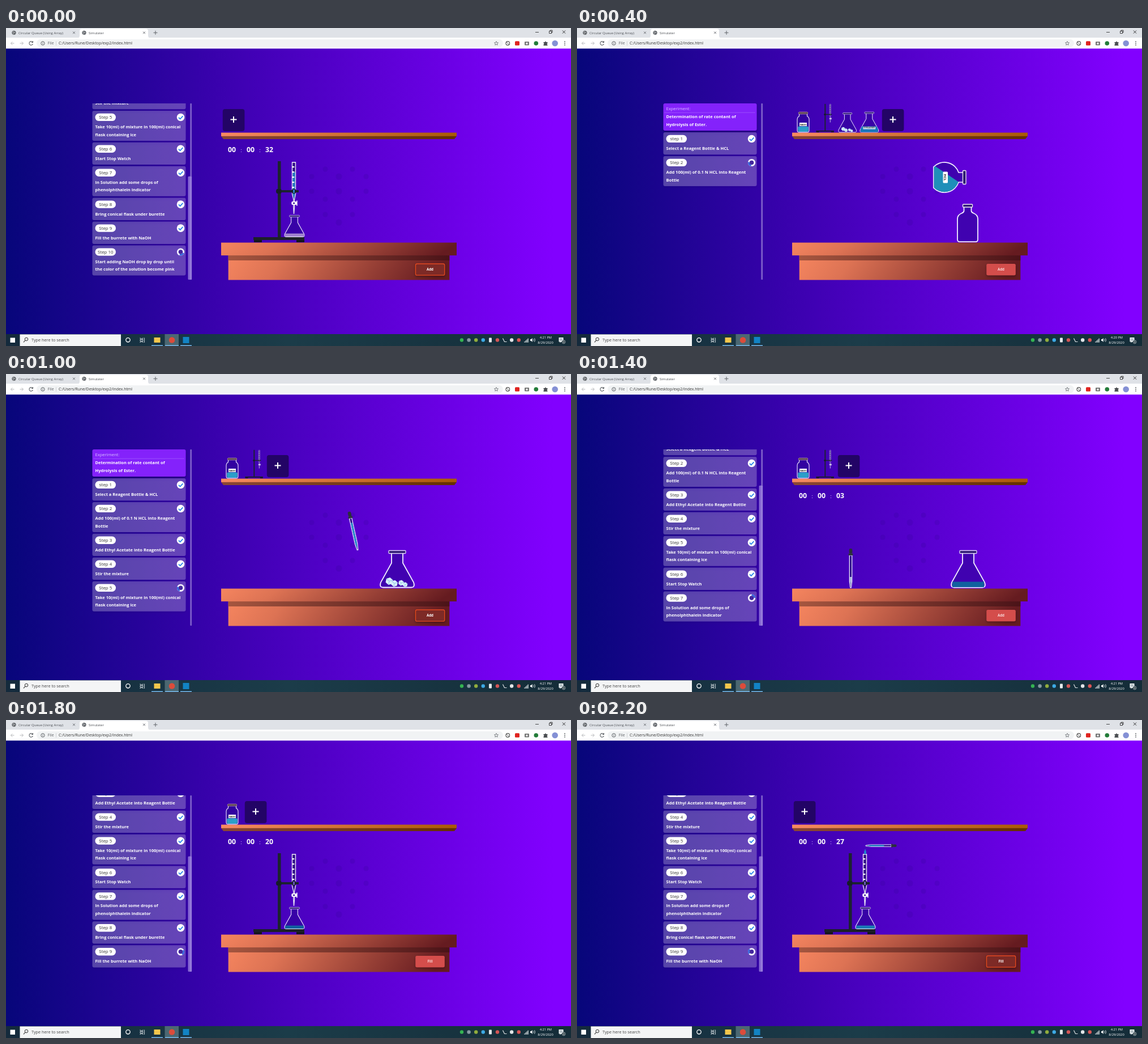
An HTML page for the animation above (2400 ms loop, 998 by 561 pixels).

```html
<!DOCTYPE html>
<html lang="en">
<head>
<meta charset="utf-8">
<title>Simulater</title>
<style>
  html, body { margin: 0; width: 100%; height: 100%; overflow: hidden; background: #4400bc; }
  svg { display: block; width: 998px; height: 561px; font-family: "Open Sans", "Noto Sans", sans-serif; }
</style>
</head>
<body>
<svg id="stage" viewBox="0 0 998 561" xmlns="http://www.w3.org/2000/svg">
  <defs>
    <linearGradient id="page"><stop stop-color="#07067a"/><stop offset=".4" stop-color="#3d01b1"/><stop offset=".97" stop-color="#8200ff"/></linearGradient>
    <linearGradient id="shelfTop"><stop stop-color="#f98a62"/><stop offset="1" stop-color="#a95a05"/></linearGradient>
    <linearGradient id="shelfEdge"><stop stop-color="#8c4634"/><stop offset="1" stop-color="#653000"/></linearGradient>
    <linearGradient id="wood" x2="1" y2=".08"><stop stop-color="#f5855f"/><stop offset=".25" stop-color="#dd7354"/><stop offset="1" stop-color="#651b20"/></linearGradient>
    <linearGradient id="woodShade"><stop stop-color="#a5563f"/><stop offset="1" stop-color="#4b1318"/></linearGradient>
    <linearGradient id="bar"><stop stop-color="#142a3c"/><stop offset=".5" stop-color="#1b3c49"/><stop offset="1" stop-color="#142c38"/></linearGradient>
    <filter id="soft" x="-10%" y="-20%" width="120%" height="150%"><feDropShadow dx="0" dy="2" stdDeviation="2" flood-opacity=".3"/></filter>
    <clipPath id="panel"><rect x="146" y="133" width="184" height="311"/></clipPath>
    <clipPath id="roundBody"><circle cy="-20" r="25.8"/></clipPath>
    <clipPath id="cone"><path d="M-10,-60V-44L-29,-10Q-32,-1 -25,-1H25Q32,-1 29,-10L10,-44V-60Z"/></clipPath>
  </defs>
  <g id="room"></g>
  <g id="list" clip-path="url(#panel)"></g>
  <g id="lab"></g>
  <g id="chrome"></g>
  <g id="clock"></g>
</svg>
<script>
const put = (id, html) => { document.getElementById(id).innerHTML = html; };
const rect = (x, y, w, h, fill, more = '') =>
  `<rect x="${x}" y="${y}" width="${w}" height="${h}" fill="${fill}" ${more}/>`;
const dot = (x, y, r, fill, more = '') => `<circle cx="${x}" cy="${y}" r="${r}" fill="${fill}" ${more}/>`;
const path = (d, stroke, width = 1, fill = 'none', more = '') =>
  `<path d="${d}" stroke="${stroke}" stroke-width="${width}" fill="${fill}" ${more}/>`;
const text = (x, y, s, size, fill = '#fff', more = '') =>
  `<text x="${x}" y="${y}" font-size="${size}" fill="${fill}" ${more}>${s}</text>`;
const place = (x, y, scale, turn, body) =>
  `<g transform="translate(${x} ${y}) rotate(${turn}) scale(${scale})">${body}</g>`;
const BOLD = 'font-weight="700"', MID = 'text-anchor="middle"';

// Glassware: local origin at the bottom centre
const glass = (d, width = 1.8) => path(d, '#f3efff', width, '#2c0496', 'fill-opacity=".6"');

const cone = (liquid, extra = '', level = 11) =>
  glass('M-10,-61V-44L-29,-10Q-32,-1 -25,-1H25Q32,-1 29,-10L10,-44V-61') +
  (liquid ? `<g clip-path="url(#cone)">${rect(-28, -level, 56, level - 1.5, liquid)}</g>` : '') + extra +
  rect(-15, -66, 30, 5, '#281070', 'rx="1" stroke="#ddd6f5" stroke-width="1.3"');

const cube = ([x, y, r]) => place(x, y, r, 12,
  path('M0,-1L.9,-.5V.5L0,1L-.9,.5V-.5Z', 'none', 0, '#d8f0fb') +
  path('M-.9,-.5L0,0L.9,-.5M0,0V1', '#8fc4e6', .16));
const ice = [[-14, -12, 6.6], [-5, -8, 6], [7, -9, 5], [14, -6, 4.4]].map(cube).join('');

const ester = cone('#1676ba', rect(-20, -19, 40, 8, '#dcecf8', 'rx="1"') +
  text(0, -13, 'ETHYLACETATE', 5, '#123', `${MID} ${BOLD}`), 20);

const roundFlask = (level, tilt) =>
  glass('M-8.5,-52.5V-45.1A26.5,26.5 0 0 0 -18.3,-.8H18.3A26.5,26.5 0 0 0 8.5,-45.1V-52.5', 1.7) +
  `<g clip-path="url(#roundBody)"><g clip-path="url(#cut)">
    <rect x="-80" width="160" height="90" fill="#1f8fb9" transform="translate(0 ${-level}) rotate(${tilt})"/></g></g>` +
  '<clipPath id="cut"><rect x="-27" y="-52" width="54" height="50.4"/></clipPath>' +
  rect(-12, -58, 24, 5.5, '#2a1070', 'rx="1" stroke="#eee" stroke-width="1.3"') +
  rect(-10, -26, 20, 8.5, '#fff', 'rx="1.5"') +
  text(0, -19.4, 'HCL', 6, '#222', `${MID} ${BOLD}`);

const bottle =
  glass('M-6.5,-62V-55Q-7,-52.5 -11,-51Q-18,-48 -18,-41V-5Q-18,-.8 -14,-.8H14Q18,-.8 18,-5V-41Q18,-48 11,-51Q7,-52.5 6.5,-55V-62') +
  rect(-8.5, -67, 17, 5, '#2f0a78', 'rx="1" stroke="#eee" stroke-width="1.4"');

const jar =
  glass('M-7,-33V-29Q-10.5,-27 -10.5,-23V-4Q-10.5,-.6 -7,-.6H7Q10.5,-.6 10.5,-4V-23Q10.5,-27 7,-29V-33', 1.1) +
  rect(-9.3, -11, 18.6, 9.4, '#2b9fc9', 'rx="2"') +
  rect(-8, -36, 16, 3, '#3a2350', 'rx="1" stroke="#d9c08a" stroke-width=".9"') +
  rect(-6.5, -17.5, 13, 6, '#fff') + text(0, -13, 'NAOH', 3.6, '#222', `${MID} ${BOLD}`);

// Stand: origin at the left end of the base
function stand(liquid) {
  let ticks = '';
  for (let y = -134; y < -88; y += 9) ticks += rect(68.8, y, 3.5, 2.2, '#fff');
  return rect(43, -143, 5.5, 135, '#1c2330') + rect(0, -9, 90, 5, '#1c2028') +
    rect(1, -4, 14, 4, '#14161d') + rect(76, -4, 14, 4, '#14161d') +
    path('M68.5,-141H74.5V-85L72.5,-76V-62L71.5,-50L70.8,-62V-76L68.5,-85Z', '#f2f2fa', 1.3, '#35108a') +
    (liquid ? path('M69.5,-124H73.7V-86L72,-77H71L69.5,-86Z', 'none', 0, liquid) : '') + ticks +
    rect(67.3, -72, 9, 6, '#fff', 'rx="2"') + rect(76, -73.5, 1.6, 9, '#fff') +
    dot(71.6, -69, 1.6, '#3a109a') + rect(40, -92, 40, 4, '#1b2230') +
    rect(40.5, -94, 9, 8, '#161c28', 'rx="2"') + rect(68, -94, 7, 8, '#161c28', 'rx="2"') +
    rect(70, -93, 3, 6, liquid || '#6a55b5');
}

// Pipette: origin at the top of the bulb
const pipette = (liquid, top) =>
  path('M-2.2,12V58L-.8,69H.8L2.2,58V12Z', '#f2f0ff', 1.2, '#2c0c8a') +
  path(`M-1.5,${top}V58L0,67L1.5,58V${top}Z`, 'none', 0, liquid) +
  rect(-2.8, 0, 5.6, 9, '#2b2f3a', 'rx="2.4"') + rect(-4, 8.5, 8, 3.5, '#30343f', 'rx="1"');

const BLUE = '#11619f', TEAL = '#1b7ab6';
const rig = (liquid, mix) => place(437, 378, 1, 0, stand(liquid)) +
  (mix ? place(509.5, 369, .585, 0, cone(mix)) : '');
const pour = (x, y, turn, level, tilt) =>
  place(x, y, 1, turn, roundFlask(level, tilt)) + place(690, 378, 1, 0, bottle);
const bench = mix => place(691, 377.5, 1, 0, mix ? cone(mix) : cone('', ice));

const dropper = place(483.5, 308, 1, 0, pipette('#a9b6dd', 50));

const frames = [
  { step: 10, shelf: 0, time: '32', btn: 'Add', spin: 20, scene: rig('#2a7fc4', '#a184cf') },
  { step: 2, shelf: 4, btn: 'Add', hot: 1, spin: 60, early: 1, scene: pour(482.5, 377.5, 0, 16, 0) },
  { step: 2, shelf: 4, btn: 'Add', hot: 1, spin: 100, early: 1, scene: pour(629, 263.5, 90, 33, -56) },
  { step: 2, shelf: 4, btn: 'Add', hot: 1, spin: 250, early: 1, scene: pour(556, 320, 45, 23, -28) },
  { step: 2, shelf: 4, btn: 'Add', hot: 1, spin: 30, early: 1, scene: pour(482.5, 377.5, 0, 16, 0) },
  { step: 5, shelf: 2, btn: 'Add', spin: 110, scene: place(606, 243, 1, -12.6, pipette('#2d8fce', 20)) + bench() },
  { step: 6, shelf: 2, time: '00', btn: 'Start', hot: 1, spin: 200, scene: dropper + bench(BLUE) },
  { step: 7, shelf: 2, time: '03', btn: 'Add', hot: 1, spin: 270, scene: dropper + bench(BLUE) },
  { step: 8, shelf: 1, time: '12', btn: 'Add', spin: 60, scene: rig() + place(600, 373, .8, 0, cone(BLUE)) },
  { step: 9, shelf: 1, time: '20', btn: 'Fill', hot: 1, spin: 330, scene: rig('', BLUE) },
  { step: 9, shelf: 0, time: '24', btn: 'Fill', spin: 70, scene: rig('', TEAL) + place(576, 224, .79, 75, pipette('#2384c4', 18)) },
  { step: 9, shelf: 0, time: '27', btn: 'Fill', spin: 140, scene: rig('', TEAL) +
      place(564.5, 221.7, .79, 90, pipette('#2384c4', 28)) +
      path('M509,227L511,233Q511,237 509,237Q507,237 507,233Z', 'none', 0, '#2384d0') },
];

const steps = [
  ['Select a Reagent Bottle &amp; HCL'],
  ['Add 100(ml) of 0.1 N HCL into Reagent', 'Bottle'],
  ['Add Ethyl Acetate into Reagent Bottle'],
  ['Stir the mixture'],
  ['Take 10(ml) of mixture in 100(ml) conical', 'flask containing ice'],
  ['Start Stop Watch'],
  ['In Solution add some drops of', 'phenolphthalein indicator'],
  ['Bring conical flask under burette'],
  ['Fill the burrete with NaOH'],
  ['Start adding NaOH drop by drop until', 'the color of the solution become pink'],
];

function mark(y, done, spin) {
  if (done) return dot(308.5, y, 6.8, '#fff') + path(`M305,${y + .3}l2.6,2.7l4.8,-5.2`, '#2a86e8', 1.8);
  return dot(308.5, y, 5.2, '#43279d', 'stroke="#f4f1ff" stroke-width="2.8"') +
    `<g transform="translate(308.5 ${y}) rotate(${spin})">` + path('M5.2,0A5.2,5.2 0 0 1 0,5.2', '#2f62dd', 2.6) + '</g>';
}

function list(active, spin) {
  let y = 184, end = 0;
  let out = rect(152.5, 133, 165, 48, '#8420fb', 'rx="3" filter="url(#soft)"') +
    text(157.5, 144.6, 'Experiment:', 7.6, '#d9c4ff') +
    path('M155,149.2H315', '#bd8dff', .8, 'none', 'stroke-dasharray="1 1"') +
    text(157.5, 159.4, 'Determination of rate contant of', 7.5, '#fff', BOLD) +
    text(157.5, 173, 'Hydrolysis of Ester.', 7.5, '#fff', BOLD);
  for (let i = 0; i < active; i++) {
    const lines = steps[i], h = lines.length > 1 ? 53 : 39.3;
    out += rect(152.5, y, 165, h, '#fff', 'rx="3" fill-opacity=".23" filter="url(#soft)"') +
      rect(157.5, y + 4.8, 36.5, 13.3, '#fff', 'rx="6.6"') +
      text(175.8, y + 14.2, `${i ? 'S' : 's'}tep ${i + 1}`, 7.9, '#333', MID) +
      mark(y + 11.5, i < active - 1, spin);
    lines.forEach((s, n) => { out += text(157.5, y + 31 + n * 13.6, s, 7.5, '#fff', BOLD); });
    end = y + h;
    y += lines.length > 1 ? 55.8 : 42;
  }
  const scroll = Math.max(0, end - 436.6), thumb = 311 * 311 / (311 + scroll);
  return `<g transform="translate(0 ${-scroll})">${out}</g>` +
    rect(325.3, 133, 2.8, 311, '#bba9e8', 'rx="1" opacity=".55"') +
    (scroll ? rect(321.5, 444 - thumb, 6.6, thumb, '#a28ae0', 'rx="1.5" opacity=".75"') : '');
}

const goods = [
  place(399.5, 184.5, 1, 0, jar),
  place(422.3, 184, .35, 0, stand()),
  place(477.7, 184.5, .53, 0, cone('', ice)),
  place(516.3, 184.5, .55, 0, ester),
];

function lab(f) {
  const x = 402 + 39 * f.shelf;
  let out = goods.slice(0, f.shelf).join('') +
    rect(x - 19.2, 143, 38.6, 39, '#230466', 'rx="4"') +
    path(`M${x - 5.5},161.5h11M${x},156v11`, '#fff', 2) + f.scene;
  if (f.time) {
    ['00', '00', f.time].forEach((s, i) => { out += text(399 + 33 * i, 219.3, s, 12.3, '#fff', `${MID} ${BOLD}`); });
    out += text(415.5, 218.6, ':', 9, '#d8ccff', MID) + text(448.5, 218.6, ':', 9, '#d8ccff', MID);
  }
  return out + (f.hot
    ? rect(723.3, 416, 51.5, 20.3, '#d44e4c', 'rx="2.5" filter="url(#soft)"')
    : rect(723.5, 416, 51.2, 20.2, '#7d2a28', 'rx="2.5" stroke="#e2481f" stroke-width="1.3" filter="url(#soft)"')) +
    text(749, 428.4, f.btn, 6.2, f.hot ? '#f8d8d8' : '#fff', `${MID} ${BOLD}`);
}

function room() {
  const rows = [[249, 564, 612], [262, 540, 588, 636], [288, 540, 588, 636], [302, 564, 612], [329, 564, 612], [343, 588]];
  return rect(0, 36, 998, 505, 'url(#page)') +
    rows.map(([y, ...xs]) => xs.map(x => dot(x, y, x === 588 ? 5.5 : 4.5, '#300494', 'opacity=".2"')).join('')).join('') +
    rect(380, 184.6, 416, 6.4, 'url(#shelfTop)') +
    path('M380,190.8H796L792,196H384Z', 'none', 0, 'url(#shelfEdge)') +
    rect(392.7, 401, 390.6, 43.5, 'url(#wood)') + rect(392.7, 401, 390.6, 9, 'url(#woodShade)') +
    rect(380, 378.6, 416, 22.6, 'url(#wood)');
}

function chrome() {
  const ink = '#5f6368', globe = x => dot(x, 8.3, 3.6, ink) + path(`M${x - 2.5},7.2h3l1.4,1.8M${x - 1},11v-2`, '#fff', .8);
  const cross = (x, y, r, c = ink) => path(`M${x - r},${y - r}l${2 * r},${2 * r}m0,${-2 * r}l${-2 * r},${2 * r}`, c, .9);
  const top = rect(0, 0, 998, 17.5, '#dfe2e7') +
    path('M126,17.5Q130,17.5 130,13V5Q130,1.5 134,1.5H247Q251,1.5 251,5V13Q251,17.5 255,17.5Z', 'none', 0, '#fff') +
    rect(0, 17, 998, 19.3, '#fff') + rect(54, 20, 824, 13.5, '#f1f3f4', 'rx="6.7"') +
    globe(14) + globe(138) +
    text(22, 10.6, 'Circular Queue (Using Array)', 6, '#4a4d52') + text(146, 10.6, 'Simulater', 6, '#4a4d52') +
    cross(120, 8.3, 1.9) + cross(244, 8.3, 1.9) + path('M260.5,8.3h7M264,4.8v7', ink, 1) +
    path('M935,7.5h6M959.5,5.5h4v4h-4zM961,5.5v-1.5h4v4h-1.5', '#222', .8) + cross(985.5, 7, 2.6, '#222') +
    path('M14.5,27h-6m2.8,-2.8l-2.8,2.8l2.8,2.8M24.5,27h6m-2.8,-2.8l2.8,2.8l-2.8,2.8', '#b6b8bb', 1) +
    path('M47,25A3.3,3.3 0 1 0 47.4,28M47.5,23v2.5h-2.5', ink, 1.1) +
    dot(65, 27, 3.2, 'none', `stroke="${ink}"`) + path('M65,26.3v2.4M65,24.7v.8', ink, .9) +
    text(73.8, 29.4, 'File', 6.9, ink) + path('M88.5,23v8', '#c5c7ca', .7) +
    text(93, 29.4, 'C:/Users/Rune/Desktop/exp2/index.html', 6.9, '#333') +
    path('M866,23.5l1,2.3l2.5,.2l-1.9,1.7l.6,2.4l-2.2,-1.3l-2.2,1.3l.6,-2.4l-1.9,-1.7l2.5,-.2Z', ink, .8) +
    dot(886.3, 27, 3.3, 'none', 'stroke="#555" stroke-width="1.2"') + path('M884,24.7l4.6,4.6', '#555', 1) +
    rect(899, 23.3, 8, 7.5, '#df2420', 'rx="1.5"') +
    rect(916, 24, 8, 6.5, '#777', 'rx="1"') + dot(920, 27.3, 1.7, '#eee') +
    dot(936.3, 27, 3.8, '#237c39') +
    path('M949.5,25h2q1.5,-3 3,0h2v2q-2,1.3 0,2.5v1.5h-7v-2q2,-1 0,-2.4z', 'none', 0, '#4b4e52') +
    dot(969.7, 27, 5.3, '#8490d5') + [24, 27, 30].map(y => dot(987, y, .9, ink)).join('');

  const white = '#eef3f5';
  let bar = rect(0, 540, 998, 21, 'url(#bar)') + rect(7.5, 546.5, 8.5, 8.5, '#fff') +
    rect(24.5, 540.5, 178.5, 20.5, '#f4f5f6') + dot(36, 549, 2.8, 'none', 'stroke="#333"') + path('M34,551l-3,3.3', '#333', 1.1) +
    text(45, 553.2, 'Type here to search', 7.3, '#444') +
    dot(215.5, 550.3, 3.7, 'none', 'stroke="#fff" stroke-width="1.3"') +
    path('M237,546.5v1.5h5v-1.5M237,555v-1.5h5v1.5M237,549.5h5v2.5h-5zM244.5,546.5v8.5', white, .8) +
    rect(280.5, 540, 24.5, 21, '#4c6872') + rect(261.5, 546, 11, 9, '#f3c64c') + dot(293, 550.5, 5.3, '#dc4c3b') +
    rect(312.5, 545, 11, 11, '#1283c4');
  [[257, 20], [281, 24], [308, 20]].forEach(([x, w]) => { bar += rect(x, 559.5, w, 1.5, '#76b9ed'); });
  ['#35b352', '#8798a2', '#91ad3d', '#3daae4', '#e4e9eb', '#d45555', '#dde2e4', '#e3e6e8', '#dd5555'].forEach((c, i) => {
    const x = 805 + i * 12.6;
    bar += i === 4 ? rect(853, 546.5, 5, 8, c, 'rx="1"') : i === 6 ? path('M877.5,547.5l3,6h4', c, 1.2) : dot(x, 550.5, 3.2, c);
  });
  [0, 1, 2, 3].forEach(i => { bar += rect(915.5 + i * 2, 553 - i * 1.8, 1.3, 1.8 + i * 1.8, '#d5dde0'); });
  bar += path('M926,549h1.7l2,-2v7l-2,-2h-1.7z', 'none', 0, white) +
    path('M931.5,548.5q1.3,2 0,4M933.5,547.3q2,3.2 0,6.4', white, .8) +
    path('M976.5,546h8v7.5h-4l-2,2v-2h-2z', 'none', 0, white) + path('M978,548.3h5M978,550.6h5', '#34505b', .7) +
    dot(985, 553.8, 3, '#20333b', 'stroke="#d9e1e4" stroke-width=".6"') + text(985, 555.6, '4', 5, '#fff', MID);
  return top + bar;
}

put('room', room());
put('chrome', chrome());

const start = performance.now();
let shown = -1;
function tick(now) {
  const i = Math.floor((Math.max(0, now - start) % 2400) / 200);
  if (i !== shown) {
    const f = frames[shown = i];
    put('list', list(f.step, f.spin));
    put('lab', lab(f));
    put('clock', text(953.3, 548.2, f.early ? '4:20 PM' : '4:21 PM', 5.7, '#fff', MID) +
      text(953, 557.3, '8/29/2020', 5.8, '#fff', MID));
  }
  requestAnimationFrame(tick);
}
tick(start);
</script>
</body>
</html>
```
